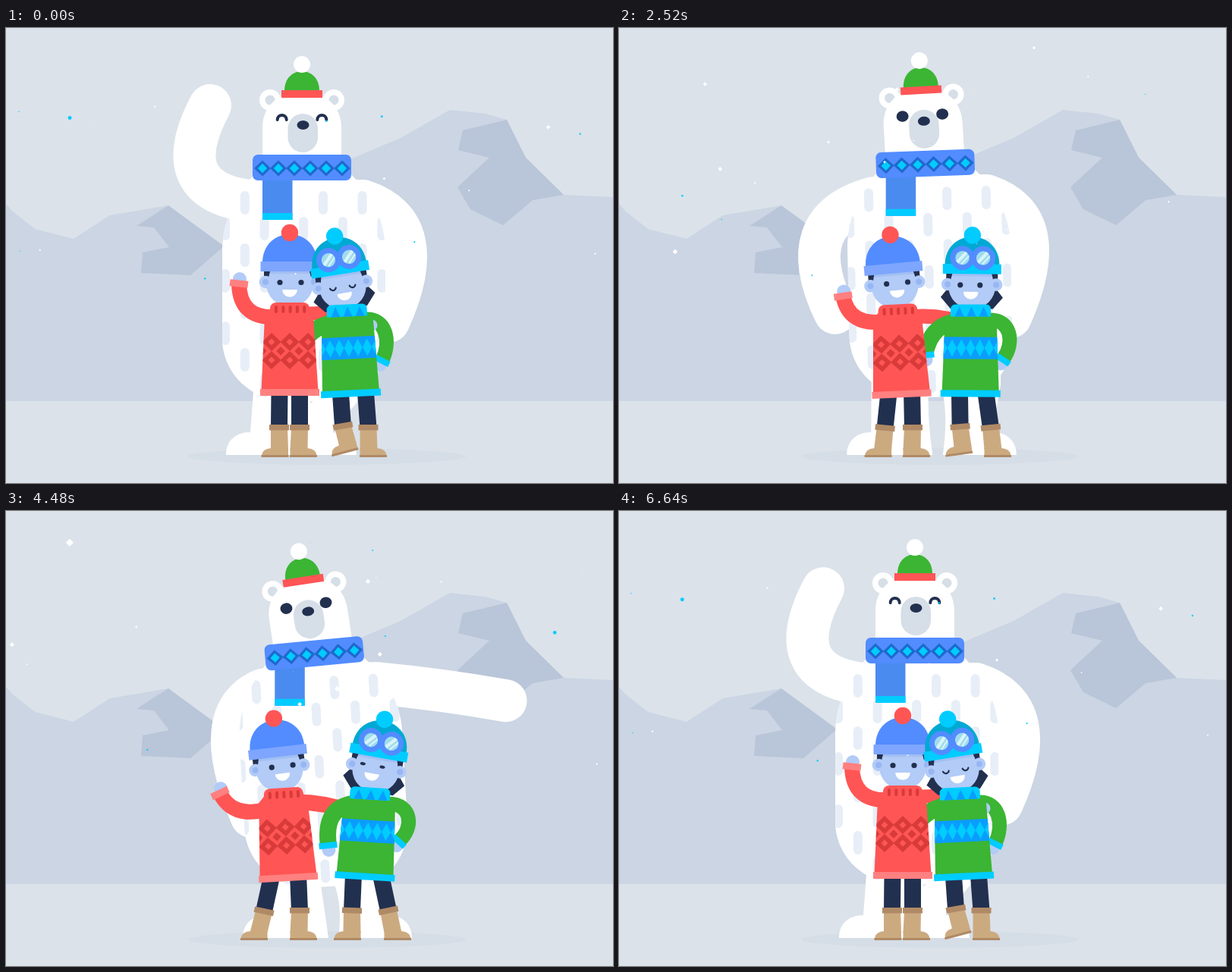
Write an HTML page with a canvas that moves like this. It is 800 by 600 pixels and loops after 6.68 s.

```html
<!DOCTYPE html>
<html lang="en">
<head>
<meta charset="utf-8">
<title>Winter friends</title>
<style>
html,body{margin:0;width:100%;height:100%;overflow:hidden;background:#dbe2ea}
canvas{display:block;width:800px;height:600px}
</style>
</head>
<body>
<canvas id="c" width="800" height="600"></canvas>
<script>
const c = document.getElementById('c').getContext('2d');
const LOOP = 6680, TAU = Math.PI * 2, RAD = Math.PI / 180;
const NAVY = '#22304f', RED = '#ff5555', PINK = '#ff8080', DARKRED = '#d93a3a', GREEN = '#3bb533',
  BLUE = '#528cff', CYAN = '#00ccff', AZURE = '#0a9dff', SKIN = '#b2cbf7', SNOW = '#fff', GREY = '#d6dee7',
  BOOT = '#ccaa80', CUFF = '#b08a66';

// Arms run from the shoulder past an elbow to the hand, measured outwards and down.
const hip = b => [1.23 * b + 23, 30, 1.2 * b - 34, 190 - 0.55 * b];

// from/to: when the move out of this pose happens; feet: toe positions;
// apart: 0 hugging, 1 standing apart; tilt: how far the boy leans
const poses = [
  { from: 0, to: 840, x: 0, y: 0, lean: 0, turn: 0, feet: [290, 462],
    left: [110, -15, 51, -126], right: hip(57), apart: 0, tilt: 0, wave: 0 },
  { from: 900, to: 1760, x: -15, y: 0, lean: -7, turn: -10, feet: [260, 440],
    left: [112, 10, 118, -112], right: hip(65), apart: 0, tilt: 0, wave: 1 },
  { from: 2080, to: 3000, x: 6, y: -3, lean: -3, turn: -6, feet: [290, 514],
    left: hip(84), right: hip(61), apart: 0, tilt: 0, wave: 0 },
  { from: 3560, to: 4360, x: 36, y: -8, lean: -1, turn: 6, feet: [312, 535],
    left: hip(54), right: hip(47), apart: 1, tilt: 1, wave: 0 },
  { from: 4640, to: 5640, x: 33, y: 3, lean: -5.4, turn: -4, feet: [312, 535],
    left: hip(41), right: [85, 8, 170, 23], apart: 1, tilt: 0.6, wave: 0 },
  { from: 6000, to: 6650, x: 15, y: 8, lean: -3, turn: -3, feet: [290, 532],
    left: hip(85), right: [98, -8, 126, -126], apart: 0, tilt: 0, wave: 0 }
];

const lerp = (a, b, k) => Array.isArray(a) ? a.map((v, i) => lerp(v, b[i], k)) : a + (b - a) * k;
function poseAt(t) {
  const i = poses.findLastIndex(p => t >= p.from), a = poses[i], b = poses[(i + 1) % poses.length];
  const k = Math.max(0, Math.min(1, (t - a.from) / (a.to - a.from))), p = {};
  for (const key in a) p[key] = lerp(a[key], b[key], k * k * (3 - 2 * k));
  return p;
}
function spin(x, y, deg, px, py) {
  const co = Math.cos(deg * RAD), si = Math.sin(deg * RAD);
  return [x + px * co - py * si, y + px * si + py * co];
}
function at(x, y, deg, draw) {
  c.save(); c.translate(x, y); c.rotate(deg * RAD); draw(); c.restore();
}
function fill(col) { c.fillStyle = col; c.fill(); }
function rect(x, y, w, h, col, r = 0) { c.beginPath(); c.roundRect(x, y, w, h, r); fill(col); }
function oval(x, y, rx, ry, col) { c.beginPath(); c.ellipse(x, y, rx, ry, 0, 0, TAU); fill(col); }
const dot = (x, y, r, col) => oval(x, y, r, r, col);
function poly(p, col) {
  c.beginPath();
  for (let i = 0; i < p.length; i += 2) c.lineTo(p[i], p[i + 1]);
  c.closePath(); fill(col);
}
const gem = (x, y, w, h, col) => poly([x, y - h, x + w, y, x, y + h, x - w, y], col);
function stroke(w, col, cap = 'butt') { c.lineWidth = w; c.strokeStyle = col; c.lineCap = cap; c.stroke(); }
function limb(p, w, col, cap) {
  c.beginPath(); c.moveTo(p[0], p[1]);
  if (p.length > 6) c.bezierCurveTo(...p.slice(2));
  else if (p.length > 4) c.quadraticCurveTo(...p.slice(2));
  else c.lineTo(p[2], p[3]);
  stroke(w, col, cap);
}
const sides = draw => { draw(-1); draw(1); };

function scenery() {
  rect(0, 0, 800, 600, '#dbe2ea');
  poly([0, 232, 9, 242, 38, 265, 89, 278, 137, 247, 214, 234, 286, 286, 418, 188, 520, 145,
    585, 108, 632, 113, 660, 121, 685, 171, 735, 220, 800, 223, 800, 492, 0, 492], '#cbd5e3');
  poly([214, 234, 172, 261, 195, 263, 215, 289, 180, 296, 178, 323, 243, 326, 287, 288], '#b9c5d8');
  poly([660, 121, 602, 135, 596, 161, 637, 171, 595, 210, 612, 239, 655, 260, 694, 227, 735, 220, 685, 171], '#b9c5d8');
  oval(423, 565, 183, 11, '#d5dde6');
}

function bearLeg(inner, toe, s) {
  const outer = inner + s * 75, heel = toe - s * (s < 0 ? 113 : 97);
  c.beginPath();
  c.moveTo(inner, 450); c.lineTo(inner, 490);
  c.quadraticCurveTo(heel + s * 6, 520, heel, 563);
  c.lineTo(toe, 563);
  c.bezierCurveTo(toe, 545, toe - s * 12, 533, toe - s * 32, 533);
  c.lineTo(outer, 470); c.lineTo(outer, 450);
  fill(SNOW);
}

function bearBody(p) {
  c.translate(-395, -480);
  c.beginPath();
  c.moveTo(285, 290); c.quadraticCurveTo(287, 235, 330, 190);
  c.lineTo(452, 190); c.quadraticCurveTo(498, 235, 500, 290);
  c.lineTo(500, 410); c.bezierCurveTo(500, 460, 470, 492, 425, 492);
  c.lineTo(360, 492); c.bezierCurveTo(315, 485, 285, 450, 285, 410);
  fill(SNOW); c.clip();
  for (let i = 0; i < 9; i++)
    for (let k = 0; k < 4; k++)
      rect(283 + i * 25.8 + p.turn, (i % 2 ? 215 : 249) + k * 69, 12, 31, '#e8eef7', 6);
}

function bearHead(t, turn) {
  const open = t > 2450 && t < 5100, fx = turn * 0.3;
  sides(s => { dot(s * 42, -89, 14, SNOW); dot(s * 42, -89, 6.5, GREY); });
  c.beginPath();
  c.moveTo(-52, 0); c.lineTo(-52, -52);
  c.bezierCurveTo(-52, -82, -30, -100, 0, -100);
  c.bezierCurveTo(30, -100, 52, -82, 52, -52);
  c.lineTo(52, 0); fill(SNOW);
  rect(-18.5 + fx, -71, 39.5, 51, GREY, 20);
  oval(1.5 + fx, -56, 8, 6, NAVY);
  sides(s => {
    const x = s * 26.3 + fx;
    if (open) return oval(x, -64, 8, 7.3, NAVY);
    c.beginPath(); c.arc(x, -63, 6, Math.PI, TAU); stroke(4, NAVY, 'round');
  });
  const drop = Math.max(0, Math.min(1, (t - 2900) / 300, (3700 - t) / 200));
  if (drop) at(-42, -61, 2, () => {
    c.scale(drop, drop); c.beginPath(); c.moveTo(0, -15);
    c.bezierCurveTo(2, -8, 6, -3, 6, 2); c.arc(0, 2, 6, 0, Math.PI); c.bezierCurveTo(-6, -3, -2, -8, 0, -15);
    fill(BLUE);
  });
  c.beginPath(); c.moveTo(-23, -100); c.bezierCurveTo(-24, -136, 24, -136, 23, -100); fill(GREEN);
  rect(-27, -102, 54, 10, RED);
  dot(0, -136, 11, SNOW);
}

function scarf() {
  rect(-65, -17, 130, 34, BLUE, 7);
  for (let x = -52; x < 60; x += 21) {
    gem(x, 1, 11, 10.5, '#2068cc'); gem(x, 1, 6.2, 6.2, CYAN);
  }
}

function bear(t, p) {
  const [toeL, toeR] = p.feet, a = p.lean * 0.6, x = 395 + p.x, y = 480 + p.y;
  bearLeg(235 + 0.575 * toeL, toeL, -1);
  bearLeg(250 + 0.34 * toeR, toeR, 1);
  sides(s => {
    const [sx, sy] = spin(x, y, a, s * 75, -252), [ex, ey, hx, hy] = s < 0 ? p.left : p.right;
    limb([sx - s * 40, sy, sx, sy], 56, SNOW);
    limb([sx, sy, sx + s * ex, sy + ey, sx + s * hx, sy + hy], 56, SNOW, 'round');
  });
  at(x, y, a, () => bearBody(p));
  const [nx, ny] = spin(x, y, a, -5, -296);
  at(nx, ny, p.lean * 1.6, () => bearHead(t, p.turn));
  rect(nx - 52, ny, 39.5, 69, '#4a8bf0');
  rect(nx - 52, ny + 60, 39.5, 9, CYAN);
  at(nx, ny, p.lean, scarf);
}

// hip x, y, cuff x, y, cuff angle, foot x, y, foot angle
function kidLeg([hx, hy, kx, ky, ka, fx, fy, fa], s) {
  limb([hx, hy - 6, kx, ky], 22, NAVY);
  poly([...spin(kx, ky, ka, -11, 0), ...spin(kx, ky, ka, 11, 0),
    ...spin(fx, fy, fa, 11.5, -10), ...spin(fx, fy, fa, -11.5, -10)], BOOT);
  at(fx, fy, fa, () => {
    c.scale(s, 1);
    c.beginPath(); c.moveTo(-11.5, 0); c.lineTo(-11.5, -12); c.lineTo(11, -12);
    c.quadraticCurveTo(23, -11, 23.5, -2); c.lineTo(23.5, 0); fill(BOOT);
    rect(-12, -3, 36, 3, CUFF);
  });
  at(kx, ky, ka, () => rect(-13, -4, 26, 7.5, CUFF));
}

function kidHead(dome, band, pom) {
  rect(-31, -52, 62, 54, SKIN, [0, 0, 30, 30]);
  rect(-31, -46, 62, 5, '#a2bff3');
  sides(s => {
    poly([s * 34, -48, s * 25, -48, s * 28, -36, s * 34, -36], NAVY);
    dot(s * 32, -30, 8.3, SKIN); dot(s * 32, -30, 4, '#98b6f2');
  });
  c.beginPath(); c.moveTo(-36, -54); c.bezierCurveTo(-37, -106, 37, -106, 36, -54); fill(dome);
  rect(-38.5, -57, 77, 13, band);
  dot(0, -95, 11.2, pom);
}
function smile(x, y) { c.beginPath(); c.arc(x, y, 9.8, 0, Math.PI); fill(SNOW); }

function boyArmBack(k) {
  limb(lerp([390, 378, 430, 371, 478, 390], [383, 384, 420, 384, 455, 397], k), 18 + 3 * k, RED);
}

function boy(t, { apart, tilt, wave }) {
  kidLeg(lerp([360.5, 485, 360, 527, 0, 360.5, 566, 0], [350, 488, 340, 528, 12, 333, 566, 0], apart), -1);
  kidLeg([387 - 2 * apart, 485, 387, 527, 0, 386, 566, 0], 1);
  const [x, y, ex, ey, sx, sy] = lerp(
    [307 - 8 * wave, 337 + 5 * wave, 308 + 4 * wave, 383 - 4 * wave, 354, 381], [282, 372, 298, 405, 342, 394], apart);
  dot(x + 1, y - 6, 9, SKIN);
  limb([x, y, ex, ey, sx, sy], 20, RED);
  at(x, y, lerp(6 - 14 * wave, -25, apart), () => rect(-12, -4.5, 24, 9, PINK));
  at(374 - 17 * tilt, 365 + 5 * tilt, -11 * tilt, () => {
    kidHead(BLUE, '#7ea6ff', RED);
    const fx = 5 * tilt, fy = -3 * tilt, shut = Math.abs(t - 840) < 70;
    for (const ex of [-13, 15])
      if (shut) rect(ex - 3.5 + fx, -30.5 + fy, 7, 1.6, '#5b74a8');
      else dot(ex + fx, -29.5 + fy, 3.6, NAVY);
    smile(fx, -20 + fy);
  });
  at(374 - 8.5 * tilt, 425 + 5 * tilt, -5.5 * tilt, () => {
    c.save();
    poly([-25, -54, 26, -54, 31, -45, 37.5, 54, -37.5, 54, -33, -45], RED);
    c.clip();
    for (let x = -24; x < 30; x += 24) {
      for (const y of [-11, 13]) { gem(x, y, 12.5, 12, DARKRED); gem(x, y, 4.5, 4.5, RED); }
      gem(x + 12, 1, 5.5, 5.5, DARKRED); gem(x - 12, 1, 5.5, 5.5, DARKRED);
    }
    c.restore();
    rect(-39, 51, 78, 9, PINK);
    rect(-26, -63, 52, 16, RED, [8, 8, 0, 0]);
    for (let x = -20; x < 20; x += 9.3) rect(x, -59, 4, 10, DARKRED, 2);
  });
}

function girlArmBack(k) {
  const p = lerp([425, 390, 405, 395, 395, 410, 385, 420], [455, 386, 428, 392, 422, 412, 424.5, 438], k);
  dot(p[6] + 1, p[7] + 9, 9, SKIN);
  limb(p, 22, GREEN);
  at(p[6], p[7] + 3, -6, () => rect(-12, -4, 24, 8, CYAN));
}

function goggle(x) {
  dot(x, -65, 16, BLUE);
  c.save(); c.beginPath(); c.arc(x, -65, 9.2, 0, TAU); fill('#9fdcec'); c.clip();
  limb([x - 7, -59, x + 6, -73], 4, '#d9f5fa');
  limb([x - 1, -57, x + 9, -68], 2, '#d9f5fa');
  c.restore();
}

function girl(t, k) {
  kidLeg(lerp([441, 488, 444, 525, -10, 453, 559, -15], [458, 485, 456, 527, 2, 456, 566, 0], k), -1);
  kidLeg(lerp([474, 487, 477.5, 527, 0, 478, 566, 0], [494, 486, 504, 527, -12, 510, 566, 0], k), 1);
  const p = lerp([474, 384, 500, 382, 508, 412, 496, 438], [504, 386, 535, 386, 538, 418, 518, 435], k);
  dot(p[6] - 3, p[7] + 7, 8, SKIN);
  limb(p, 19, GREEN);
  at(p[6], p[7] + 1, lerp(27, 42, k), () => rect(-10, -4, 20, 8, CYAN));
  if (k < 0.3) dot(482, 392, 7.5, SKIN);
  const sway = Math.cos(t / LOOP * 2 * TAU);
  at(lerp(449.2 - 1.2 * sway, 482.5, k), 368.3, lerp(-7.6 - 1.4 * sway, 10, k), () => {
    sides(s => poly([s * 20, -30, s * 30, -27, s * 41, -13, s * 28, 2, s * 10, 2], NAVY));
    kidHead('#00a9d3', CYAN, CYAN);
    const fx = -5 * k, fy = -6 * k;
    const open = t > 2500 && t < 4950, half = Math.abs(t - 4480) < 60;
    sides(s => {
      const x = s * 13 + fx, y = -26.5 + fy;
      if (open) return oval(x, y, 3.6, half ? 2 : 3.6, NAVY);
      c.beginPath(); c.arc(x, y - 2, 4, 0.25, Math.PI - 0.25); stroke(2.2, NAVY, 'round');
    });
    smile(fx + 1, -19 + fy * 0.5);
    goggle(-13); goggle(14.5);
  });
  at(lerp(451.8, 476.5, k), 425.5, lerp(-2.8, 3.6, k), () => {
    c.save();
    poly([-26, -49, 26, -49, 34, -43, 37.5, 54, -37.5, 54, -34, -41], GREEN);
    c.clip();
    rect(-40, -18, 80, 29, AZURE);
    for (let i = -3; i < 4; i++) gem(i * 12.2, -3.5, 6, 11.5, CYAN);
    c.restore();
    rect(-39.5, 52, 79, 9, CYAN);
    rect(-26.5, -61, 53, 16, CYAN, [6, 6, 0, 0]);
    for (let x = -15; x < 20; x += 16) poly([x - 6, -45, x, -58, x + 6, -45], AZURE);
  });
}

let seed = 29;
const rnd = () => (seed = seed * 16807 % 2147483647) / 2147483647;
const flakes = Array.from({ length: 48 }, () => ({
  x: rnd() * 800 - 30, y: rnd() * 360 - 60, born: rnd() * LOOP, life: 2400 + rnd() * 1800,
  vx: 8 + rnd() * 22, vy: 28 + rnd() * 26, r: 1.3 + rnd() ** 2 * 4, blue: rnd() < 0.24
}));
function snow(t) {
  for (const f of flakes) {
    const age = (t - f.born + LOOP) % LOOP;
    if (age > f.life) continue;
    const s = age / 1000, r = f.r * Math.sin(Math.PI * age / f.life);
    const x = f.x + f.vx * s, y = f.y + f.vy * s;
    if (f.blue) dot(x, y, r * 0.5 + 0.3, CYAN);
    else gem(x, y, r, r, SNOW);
  }
}

function draw(t) {
  const p = poseAt(t);
  scenery();
  bear(t, p);
  boyArmBack(p.apart);
  girlArmBack(p.apart);
  boy(t, p);
  girl(t, p.apart);
  snow(t);
}

const start = performance.now();
function frame() {
  draw((performance.now() - start) % LOOP);
  requestAnimationFrame(frame);
}
frame();
</script>
</body>
</html>
```
